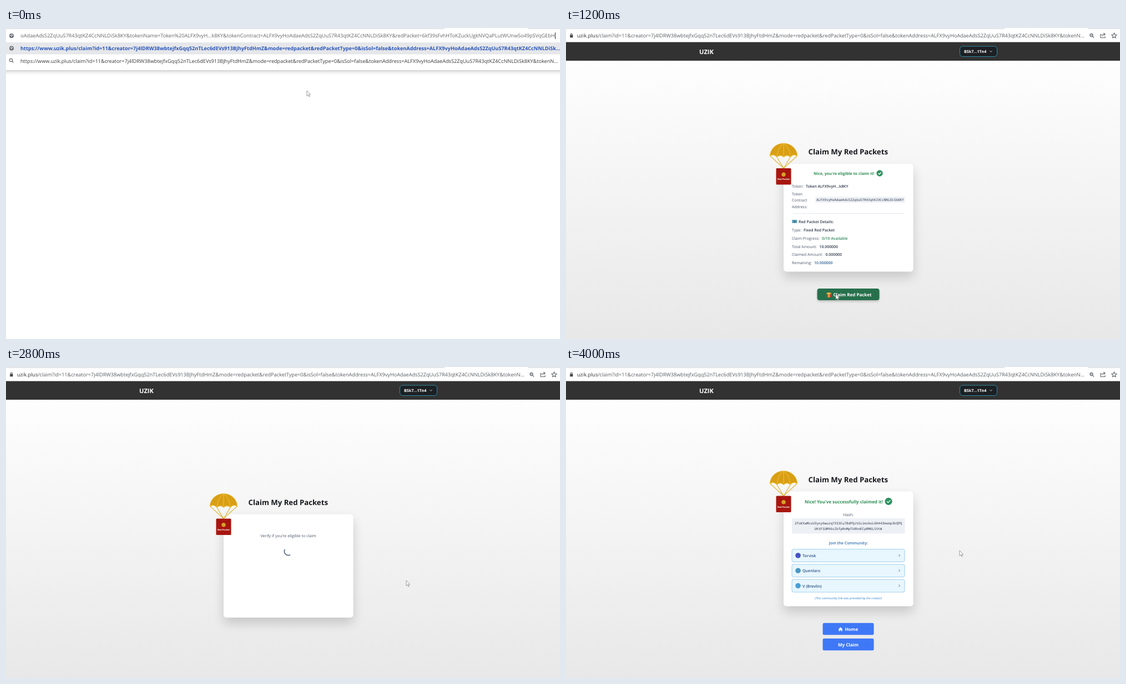
These frames come from a looping animation (998x561 px, 4.1 s). An HTML page:

```html
<!DOCTYPE html>
<html lang="en">
<head>
<meta charset="utf-8">
<title>Claim a red packet</title>
<style>
html, body { margin: 0; width: 100%; height: 100%; overflow: hidden; background: #fff; }
svg { display: block; width: 998px; height: 561px; }
text { font: 6.9px "Open Sans", "Noto Sans", sans-serif; fill: #4a5568; text-rendering: geometricPrecision; white-space: pre; }
.url { font-size: 9.13px; fill: #5a5d62; }
.b { font-weight: 600; fill: #2d3748; }
.mono { font: 5.97px "Noto Sans Mono", "DejaVu Sans Mono", monospace; fill: #2d3748; }
.mid { text-anchor: middle; }
.title { font-size: 13.2px; font-weight: 700; fill: #16181d; }
.good { font-weight: 700; fill: #2f8f55; }
.btn { font-size: 8px; font-weight: 700; fill: #fff; }
.line { fill: none; stroke: #5f6368; stroke-width: 1.1; }
</style>
</head>
<body>
<svg id="stage" viewBox="0 0 998 561"></svg>
<script>
const LOOP = 4100, STEP = 100;
const TOKEN = 'ALFX9vyHoAdaeAdsS2ZqUuS7R43qtKZ4CcNNLDiSk8KY';
const SHORT = 'ALFX9vyH...k8KY';
const HOST = 'uzik.plus';
const QUERY = '/claim?id=11&creator=7j4lDRW38wbtejfxGqq52nTLec6dEVs913BJhyFtdHmZ&mode=redpacket' +
  '&redPacketType=0&isSol=false&tokenAddress=';
const TAIL = TOKEN.slice(7) + '&tokenName=Token%20' + SHORT + '&tokenContract=' + TOKEN +
  '&redPacket=6kf39sFvhHToKZuckUgkNVQaPLutWUnwSo49pSVqGEbH';

const esc = s => s.replace(/&/g, '&amp;');
const text = (x, y, s, cls = '', style = '') =>
  `<text x="${x}" y="${y}" class="${cls}" style="${style}">${esc(s)}</text>`;
const rect = (x, y, w, h, fill, r = 0, extra = '') =>
  `<rect x="${x}" y="${y}" width="${w}" height="${h}" rx="${r}" fill="${fill}" ${extra}/>`;
const path = (d, extra = 'class="line"') => `<path d="${d}" ${extra}/>`;
const dot = (x, y, r, fill, extra = '') => `<circle cx="${x}" cy="${y}" r="${r}" fill="${fill}" ${extra}/>`;

const tabStrip = rect(0, 0, 790, 2, '#e3e5e9') + rect(940, 0, 58, 2, '#e3e5e9');
const globe = y => dot(10, y, 4, '#5f6368') +
  path(`M7 ${y - 1}l2.5 1 1 2M10 ${y - 3}l1 2 2 .5`, 'fill="none" stroke="#fff" stroke-width="1.1"');
const glass = (x, y) => dot(x, y, 2.6, 'none', 'class="line"') + path(`M${x + 2} ${y + 2}l2.6 2.6`);
const check = (x, y, r) => dot(x, y, r, '#2f9360') +
  path(`M${x - r * .45} ${y}l${r * .33} ${r * .35} ${r * .6} ${-r * .65}`, 'fill="none" stroke="#fff" stroke-width="1.3"');

const addressPage = `<g id="address">
  ${rect(-20, 0, 1038, 76, '#000', 0, 'opacity=".36" filter="url(#blur5)"')}
  ${rect(0, 0, 998, 76, '#fff')}${tabStrip}
  ${rect(0, 26, 998, 21.5, '#e6e7ea')}
  ${globe(14)}${globe(36.5)}${glass(9, 58)}
  <g clip-path="url(#field)">${text(988.5, 17, TAIL, 'url', 'text-anchor:end;fill:#666')}</g>
  ${rect(989, 8, 1, 12, '#333')}
  ${text(26, 40, 'https://www.' + HOST + QUERY + TOKEN.slice(0, 41) + '...', 'url', 'font-weight:700;fill:#2a56b8')}
  ${text(26, 62.5, 'https://www.' + HOST + QUERY + TOKEN + '&tokenN...', 'url', 'fill:#3a3a3a')}
</g>`;

const site = `<g id="site">
  ${rect(0, 0, 998, 561, 'url(#page)')}
  ${rect(0, 0, 998, 26, '#fff')}${tabStrip}
  ${rect(7.2, 12.5, 5.2, 4.8, '#444', .6)}${path('M8.2 13v-1.3a1.6 1.6 0 0 1 3.2 0v1.3')}
  <text x="20" y="17" class="url"><tspan fill="#333">${HOST}</tspan>${esc(QUERY + TOKEN + '&tokenN...')}</text>
  ${glass(946.5, 13)}${path('M945 13h3')}
  ${path('M965 11.5h-2v6h8v-2.5M965.5 15c.3-2.5 2-3.7 4.5-3.7M968.5 9l2.7 2.3-2.7 2.3')}
  ${path('M987.5 9l1.4 3 3.2.4-2.4 2.2.7 3.2-2.9-1.6-2.9 1.6.7-3.2-2.4-2.2 3.2-.4z')}
  ${rect(0, 25.5, 998, 33.5, '#323232')}
  ${text(240, 46.5, 'UZIK', '', 'font-size:11.1px;font-weight:700;fill:#fff')}
  ${rect(709.5, 33, 67, 18.5, '#1d2023', 5, 'stroke="#2f8ba8"')}
  ${text(717, 45, 'BSk7...1Tn4', '', 'font-size:7.2px;font-weight:700;fill:#fff')}
  ${path('M763.5 41.3l2 1.8 2-1.8', 'fill="none" stroke="#ddd"')}
</g>`;

// Parachute, heading and card; y = 0 is the top of the card.
const scallops = 'Q410-19 404-12Q398-18 392-12Q386-18 380-12Q374-19 367.5-14';
const card = height => `
  ${rect(392, 10, 233.5, height, '#000', 5, 'opacity=".16" filter="url(#blur10)"')}
  ${rect(392, 0, 233.5, height, '#fff', 5)}
  ${text(436.5, -17, 'Claim My Red Packets', 'title')}
  ${path('M368-14L392 8 416-14M380-12L392 8 404-12', 'fill="none" stroke="#dfb53a" stroke-width="1.2"')}
  ${path('M367.5-14A24.5 23 0 0 1 416.5-14' + scallops + 'Z', 'fill="#d99f14" stroke="#e6b52f" stroke-width=".8"')}
  ${path('M380-12Q381-30 392-37Q403-30 404-12M392-37V-12M416.5-14' + scallops, 'fill="none" stroke="#f1c648" stroke-width=".9"')}
  ${rect(378.5, 8, 27, 29.5, '#a8160f', 1.5)}
  ${path('M379 9L392 18 405 9', 'fill="none" stroke="#8c120d"')}
  ${dot(392, 19.3, 3.7, '#d8a02a')}
  ${text(392, 29.3, 'Red Packet', 'mid', 'font-size:4px;font-weight:700;fill:#fff')}`;
const scene = (id, top, height, body) =>
  `<g id="${id}"><g transform="translate(0 ${top})">${card(height)}</g>${body}</g>`;

const pair = (y, label, x, value, style = '') => text(407, y, label) + text(x, y, value, 'b', style);
const claim = scene('claim', 245, 194.5, `
  ${text(446, 265, "Nice, you're eligible to claim it!", 'good', 'font-size:7.15px')}
  ${check(565, 262, 5.7)}
  ${pair(287.5, 'Token:', 432, 'Token ' + SHORT)}
  ${['Token', 'Contract', 'Address:'].map((s, i) => text(407, 302 + i * 11.3, s)).join('')}
  ${rect(449, 304.5, 161.5, 10.5, '#edf0f5', 1)}${text(451, 312, TOKEN, 'mono')}
  ${rect(407, 334, 203, 1, '#e2e8f0')}
  ${rect(407, 346, 9.5, 6, '#6aa7b8', 1)}${rect(410, 347, 3.5, 4, '#3f7d9c')}
  ${text(419, 351.5, 'Red Packet Details:', 'b')}
  ${pair(366.5, 'Type:', 428, 'Fixed Red Packet')}
  ${pair(381.5, 'Claim Progress:', 461, '0/10 Available', 'fill:#2f855a')}
  ${pair(396.5, 'Total Amount:', 456.5, '10.000000')}
  ${pair(411, 'Claimed Amount:', 467.5, '0.000000')}
  ${pair(426, 'Remaining:', 447, '10.000000', 'fill:#2c5f94')}
  ${rect(453, 473, 111, 20, '#000', 4, 'opacity=".22" filter="url(#blur2)"')}
  ${rect(452.5, 470, 112, 21, '#369866', 4, 'id="claimButton"')}
  ${rect(470, 479, 7, 7, '#d9442f')}${rect(469.5, 477.5, 8, 2.5, '#e8a33a')}${rect(472.7, 477, 1.7, 9, '#f5cf55')}
  ${text(481.5, 484.3, 'Claim Red Packet', 'btn')}`);

const verify = scene('verify', 265.5, 186.5, `
  ${text(508.5, 307, "Verify if you're eligible to claim", 'mid', 'font-size:7.1px')}
  ${path('M-6.76-1.81A7 7 0 0 1 6.76-1.81', 'id="spinner" fill="none" stroke="#718096" stroke-width="2"')}`);

const link = (y, name, color) => `
  ${rect(407, y, 203, 22.8, '#e8f6fe', 3, 'stroke="#9fd0ec"')}
  ${dot(418, y + 11.3, 4.8, color)}
  ${text(426, y + 14.2, name, 'b', 'font-size:7.1px;fill:#2c5282')}
  ${path(`M599.5 ${y + 9.3}l2 2-2 2`, 'fill="none" stroke="#4a6f96"')}`;
const button = y => rect(462.5, y, 92, 21.5, '#3f78f6', 2.5);
const done = scene('done', 224.5, 207, `
  ${text(430, 246, "Nice! You've successfully claimed it!", 'good', 'font-size:7.95px')}
  ${check(581, 242.3, 6.6)}
  ${text(508.5, 268.5, 'Hash:', 'mid', 'font-size:7.1px')}
  ${rect(407, 273, 203.5, 27.5, '#edf0f5', 2)}
  ${text(508.7, 283.8, '2foKXwMssU3yny6wurq7XS3Cu78dPQztGcimzkoL6H443mxmp3kQPQ', 'mono mid')}
  ${text(508.5, 293.5, 'UKtFSUMV6sZkfpRnMpTkRhnECpRM6LSVtW', 'mono mid')}
  ${text(508.7, 320, 'Join the Community:', 'b mid', 'font-size:7.1px;fill:#2b6cb0')}
  ${link(328.7, 'Torvisk', '#4653c4')}${link(356, 'Quenlaro', '#4a96c4')}${link(383.3, 'V (Brevlin)', '#4a9fd4')}
  ${text(508.7, 418.5, '(This community link was provided by the creator)', 'mid', 'font-size:5.55px;font-style:italic;fill:#3182ce')}
  ${button(461.7)}${button(489.7)}
  ${path('M490.5 473.3l4-3.7 4 3.7h-1v3.3h-2v-2h-2v2h-2v-3.3z', 'fill="#fff"')}
  ${text(502.5, 476.3, 'Home', 'btn')}${text(508.5, 504.2, 'My Claim', 'btn mid')}`);

const blur = size => `<filter id="blur${size}" x="-20%" y="-50%" width="140%" height="200%"><feGaussianBlur stdDeviation="${size}"/></filter>`;

stage.innerHTML = `<defs>
  <linearGradient id="page" x2="0" y2="1"><stop offset=".1" stop-color="#fefefe"/><stop offset="1" stop-color="#e8e8e8"/></linearGradient>
  ${blur(2)}${blur(5)}${blur(10)}
  <clipPath id="field">${rect(26, 0, 963, 26)}</clipPath>
</defs>
${addressPage}${site}${claim}${verify}${done}
<g id="cursor">
  ${path('M0 0V9.6L2.3 7.6 3.8 11 5.2 10.4 3.8 7.1H6.6Z', 'id="arrow" fill="#fff" stroke="#808080" stroke-width=".8"')}
  ${path('M-1 1q1-1.6 2 0v4l4.2 1q1 .3.8 1.8l-.8 3.2v1.7h-5l-3.4-4.6q-.1-1.5 1.2-.9l1 .9z', 'id="hand" fill="#fff" stroke="#333" stroke-width=".8"')}
</g>`;

const pointer = [
  [0, 542, 113], [600, 542, 113], [700, 475.5, 485], [1200, 486, 480], [1400, 486, 480],
  [1800, 721, 385], [2800, 721, 385], [3300, 713, 329], [4000, 709, 331]
];

function pointerAt(t) {
  const i = Math.max(1, pointer.findIndex(k => k[0] >= t));
  const [t0, x0, y0] = pointer[i - 1], [t1, x1, y1] = pointer[i];
  const p = (t - t0) / (t1 - t0);
  return [x0 + (x1 - x0) * p, y0 + (y1 - y0) * p];
}

const byId = id => document.getElementById(id);
const show = (id, on) => byId(id).style.display = on ? '' : 'none';

function draw(now) {
  const t = Math.floor(now % LOOP / STEP) * STEP;
  show('address', t < 700);
  show('site', t >= 700);
  show('claim', t >= 700 && t < 1500);
  show('verify', t >= 1500 && t < 2900);
  show('done', t >= 2900);
  const pointing = t >= 700 && t < 1200;
  show('hand', pointing);
  show('arrow', !pointing);
  byId('cursor').setAttribute('transform', `translate(${pointerAt(t)})`);
  byId('claimButton').setAttribute('fill', t < 800 ? '#369866' : t < 1200 ? '#2f855a' : '#27704c');
  byId('spinner').setAttribute('transform', `translate(508.5 332.5) rotate(${(t - 2100) * 585 / 700})`);
  requestAnimationFrame(draw);
}
requestAnimationFrame(draw);
</script>
</body>
</html>
```
